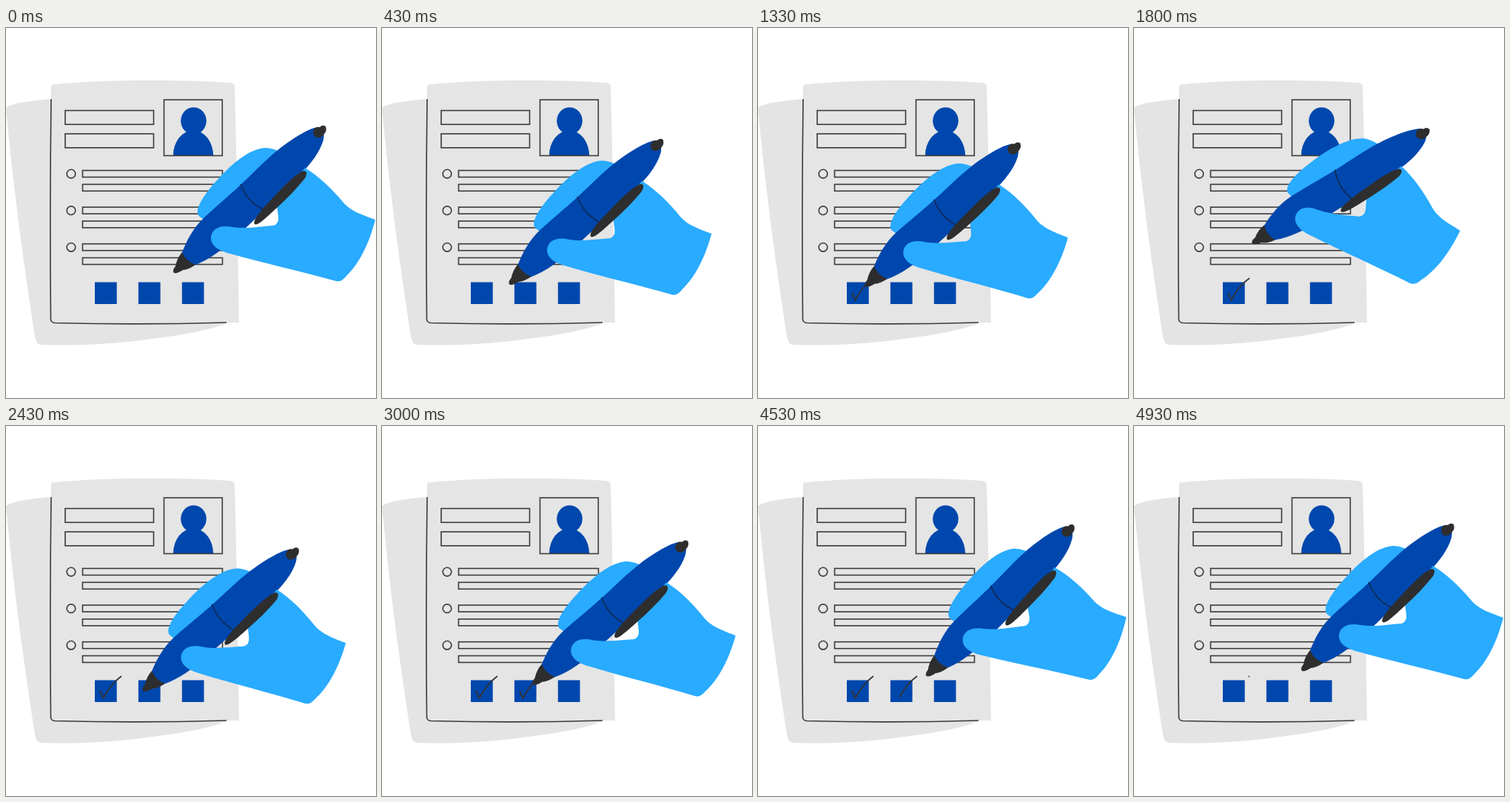
These frames come from a looping animation (500 by 500 pixels, 5.01 s). An HTML page:

```html
<!DOCTYPE html>
<html lang="en">
<head>
<meta charset="utf-8">
<title>Filling in a form</title>
<style>
html, body { margin: 0; width: 100%; height: 100%; overflow: hidden; background: #fff; }
svg { display: block; width: 100%; height: 100%; }
.line { fill: none; stroke: #3a3a3a; stroke-width: 1.6; }
.blue { fill: #0047ad; }
.sky { fill: #29abff; }
.dark { fill: #2e2e2e; }
.tick { fill: none; stroke: #333; stroke-width: 1.8; stroke-linejoin: round; }
</style>
</head>
<body>
<svg viewBox="0 0 500 500">
  <path fill="#e4e4e4" d="M0 109C2 103 30 98 62 96L90 380L298 399C270 410 230 416 190 421C145 427 95 430 46 428Q41 427 39 417Q13 250 0 109Z"/>
  <path fill="#e5e5e5" d="M61 78Q62 76 66 76C130 70 230 69 303 74Q309 75 309 80C312 180 313 290 315 398L298 398Q180 402 65 399Q61 398 60.500 394Q59 250 61 78Z"/>
  <path class="line" d="M61 96Q59 250 60.500 394Q61 398 66 398.500Q180 401.500 298 398"/>
  <g id="form" class="line"></g>
  <g class="blue">
    <ellipse cx="253.500" cy="125.500" rx="17.300" ry="18.300"/>
    <path d="M226 172A27 33.500 0 0 1 280 172Z"/>
    <g id="boxes"></g>
  </g>
  <rect class="line" x="213.500" y="97" width="78.800" height="75.500"/>
  <g id="ticks"></g>
  <g id="hand">
    <path class="sky" d="M262 255C253 249 264 229 284 207C306 182 330 163 350 162Q364 162 385 175L340 240L266 258Z"/>
    <path class="blue" d="M237 306C244 287 253 270 268 256C283 242 301 227 318 211C334 196 350 179 366 166C386 150 408 136 421 134Q432 136 429 151C424 168 413 182 398 198C370 227 335 260 306 287C287 304 268 317 250 322Z"/>
    <path fill="none" stroke="#14264e" stroke-width="1.500" d="M317 211C323 227 334 239 349 246"/>
    <path class="dark" d="M238 303Q243 315 256 320Q246 327 239 327Q232 332 227 331Q224 328 229 322Q231 311 238 303Z"/>
    <path class="dark" d="M416 145C413 138 418 133 424 134Q428 130 432 133Q434 139 430 143C427 149 419 150 416 145Z"/>
    <path class="sky" d="M404 189C424 201 442 219 456 236C466 247 477 251 499 259C492 287 479 317 460 335Q453 344 446 342C400 329 345 317 303 305C286 301 276 293 277 282C279 270 291 266 306 269C325 272 345 268 361 267Q369 265 368 255L366 240L385 212Z"/>
    <path class="dark" d="M336 265C332 260 348 243 364 226C378 211 392 197 402 193Q409 193 404 203C393 217 380 230 366 243C353 255 340 268 336 265Z"/>
  </g>
</svg>
<script>
const LOOP = 5010, STEPS = 100, DRAW = 12.5, ERASE = 4.9;
const NS = "http://www.w3.org/2000/svg";
const byId = id => document.getElementById(id);
const clamp = u => Math.min(1, Math.max(0, u));
const ease = u => u * u * (3 - 2 * u);

function add(parent, tag, attrs) {
  const el = document.createElementNS(NS, tag);
  for (const k in attrs) el.setAttribute(k, attrs[k]);
  parent.appendChild(el);
  return el;
}

const rect = (parent, x, y, width, height) => add(parent, "rect", { x, y, width, height });

const form = byId("form");
for (const y of [111.5, 143]) rect(form, 80, y, 119.5, 18.8);
for (let i = 0; i < 3; i++) {
  const y = 192.5 + i * 49.6;
  add(form, "circle", { cx: 88, cy: y + 4.6, r: 5.8 });
  rect(form, 103.5, y, 189, 9);
  rect(form, 103.5, y + 18.8, 189, 9);
  rect(byId("boxes"), 120 + i * 58.9, 343.5, 29.7, 29.5);
}

// Ticks are drawn in order and erased in reverse.
const ticks = [0, 1].map(i => {
  const x = i * 59;
  const el = add(byId("ticks"), "path", {
    class: "tick",
    d: "M127 358Q129 362 131.500 368Q141 349 156 338",
    transform: `translate(${x} 0)`
  });
  return { el, x, len: el.getTotalLength(), draw: 17 + i * 33, erase: 94.25 - i * 4.5 };
});

const drawn = (t, n) => clamp((n - t.draw) / DRAW) ** 1.5;
const erased = (t, n) => clamp((n - t.erase) / ERASE);

// Pose of the pen: tip x, tip y, turn about the tip.
function onTick(t, n) {
  const p = t.el.getPointAtLength(drawn(t, n) * t.len);
  return [p.x + t.x + 1, p.y, 1.2];
}

const REST = [228, 329, 0], LIFT = [162, 282, 12.8];
const [first, second] = ticks;
const stops = [
  [0, REST],
  [first.draw, onTick(first, 0)],
  [first.draw + DRAW, onTick(first, STEPS)],
  [38, LIFT],
  [second.draw, onTick(second, 0)],
  [second.draw + DRAW, onTick(second, STEPS)],
  [70, REST],
  [STEPS, REST]
];

function poseAt(n) {
  const busy = ticks.find(t => n >= t.draw && n <= t.draw + DRAW);
  if (busy) return onTick(busy, n);
  const i = stops.findIndex(s => s[0] > n);
  const [t0, a] = stops[i - 1], [t1, b] = stops[i];
  const u = ease((n - t0) / (t1 - t0));
  return a.map((v, k) => v + (b[k] - v) * u);
}

// Slight dip of the resting hand about the wrist.
const sway = n => -2.8 * Math.sin(Math.PI * clamp((n - 71) / 28)) ** 2;

// Two steps per 100 ms, at 0 and 30 ms.
function stepAt(ms) {
  const t = ms % LOOP;
  return Math.min(STEPS - 1, 2 * Math.floor(t / 100) + (t % 100 >= 30 ? 1 : 0));
}

function render(ms) {
  const n = stepAt(ms);
  const [x, y, turn] = poseAt(n);
  byId("hand").setAttribute("transform",
    `rotate(${sway(n)} 470 300) translate(${x} ${y}) rotate(${turn}) translate(${-REST[0]} ${-REST[1]})`);
  for (const t of ticks) {
    const from = erased(t, n) * t.len, shown = drawn(t, n) * t.len - from;
    t.el.style.display = shown > .1 ? "" : "none";
    t.el.setAttribute("stroke-dasharray", `0 ${from} ${shown} ${t.len + 9}`);
  }
}

const start = performance.now();
function frame() {
  render(Math.max(0, performance.now() - start));
  requestAnimationFrame(frame);
}
frame();
</script>
</body>
</html>
```
